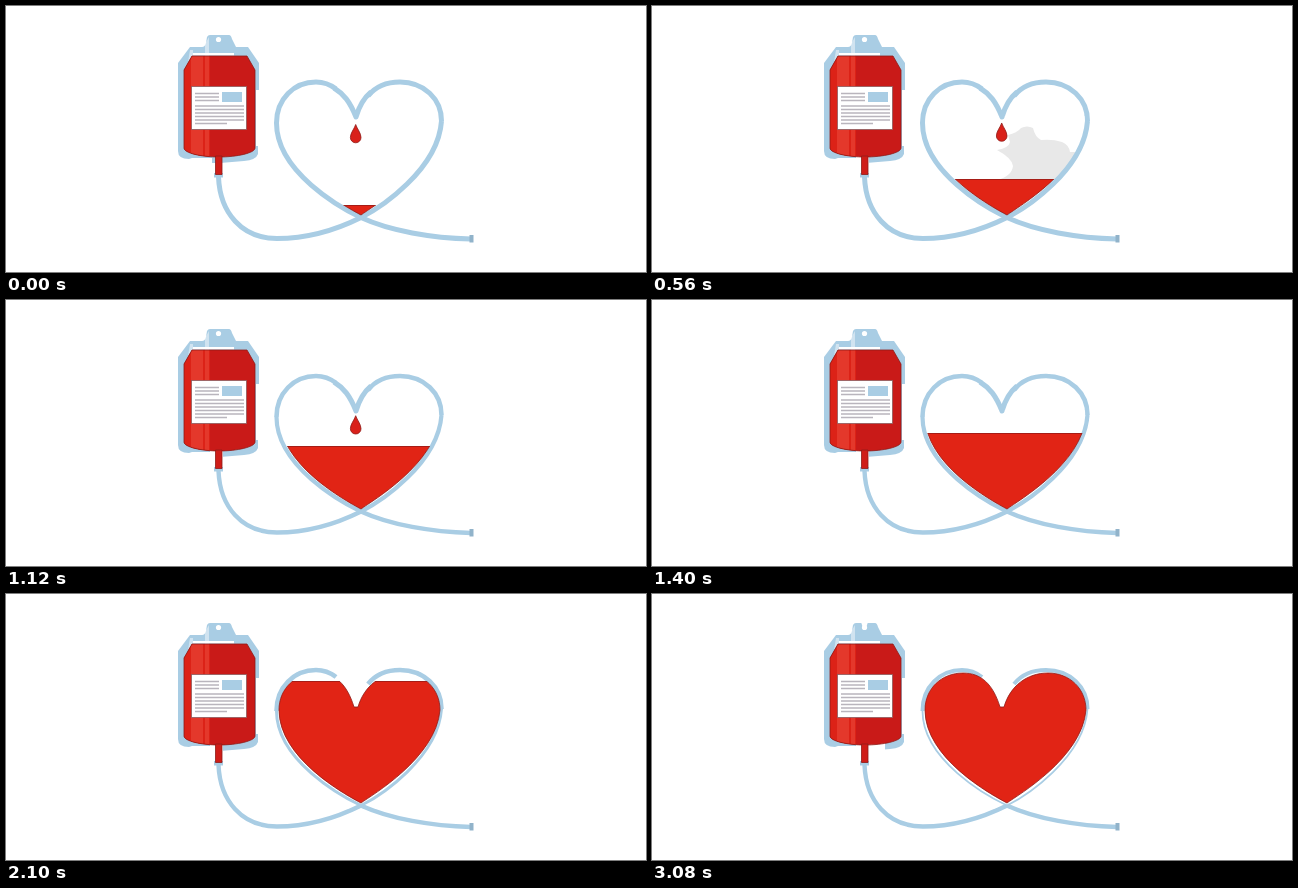
These frames come from a looping animation (640x266 px, 3.15 s). An HTML page:

```html
<!DOCTYPE html>
<html lang="en">
<head>
<meta charset="utf-8">
<title>Blood donation</title>
<style>
html, body { margin: 0; width: 100%; height: 100%; overflow: hidden; background: #fff; }
svg { display: block; width: 100vw; height: 100vh; }
.tube { fill: none; stroke: #a9cde4; stroke-width: 5; stroke-linejoin: round; }
.edge { stroke: #8f1b17; stroke-width: .8; }
.print { fill: none; stroke: #b9b5bd; stroke-width: 1.3; }
</style>
</head>
<body>
<svg viewBox="0 0 640 266">
  <defs>
    <clipPath id="level"><rect id="fill" x="260" width="190" height="150"/></clipPath>
    <clipPath id="body"><path id="bagShape" d="M186 50H241L249 64V142C249 147 231 151 213 151S178 147 178 142V64Z"/></clipPath>
  </defs>

  <!-- bag -->
  <path fill="#a9cde4" d="M201 31Q202 29 204 29H223Q225 29 226 33L230 41H242L253 57V84H250V140H252V148Q250 154 238 155L214 157H206V152H186L183 153Q172 153 172 145V57L184 41H196Q199 41 200 37Z"/>
  <path fill="#fff" d="M187 47H228V49.5H187Z"/>
  <path fill="#fff" opacity=".45" d="M199 38L203 31V50H199ZM184 44H187V50L182 56Z"/>
  <circle cx="212.5" cy="33.5" r="2.6" fill="#fff"/>
  <path id="notch" fill="#fff" d="M209 28H216L214 34H211Z"/>
  <rect id="gap" x="204" y="146" height="12" fill="#fff"/>
  <g clip-path="url(#body)">
    <path fill="#c91a18" d="M170 45H255V155H170Z"/>
    <path fill="#dc2217" d="M170 45H204V155H170Z"/>
    <path fill="#e4382b" d="M185 45H197V155H185ZM199 45H203V155H199Z"/>
  </g>
  <use href="#bagShape" fill="none" class="edge"/>
  <rect x="185.5" y="80.5" width="55" height="43" fill="#fff" stroke="#8d5a5c" stroke-width=".8"/>
  <rect x="216" y="86" width="20" height="10" fill="#a9cde4"/>
  <path class="print" d="M189 87.5H213M189 91H213M189 94.5H213M189 100H238M189 103.5H238M189 107H238M189 110.5H238M189 114H238M189 117.5H221"/>
  <path fill="#a9cde4" d="M208 167H217V171.500H208Z"/>
  <path class="edge" fill="#cf1d18" d="M209.500 150H216V168.500H209.500Z"/>

  <path id="blob" fill="#e8e8e8" d="M356 129Q365 127 369 122Q375 119 381 122Q383 131 389 134Q401 133 410 136Q417 139 418 146H424Q416 160 403 174H345Q360 170 361 160Q360 152 345 144Q357 142 358 136Z"/>

  <!-- tubing -->
  <path id="line" class="tube" d="M212.500 171C214 207 236 232.500 271 232.500C304 232.500 334 222 355 211.500M355 211.500C384 225 426 232 465 233"/>
  <path fill="#91b3ca" d="M463.500 229H467.500V236.500H463.500Z"/>
  <path id="lower" class="tube" d="M270.500 117C270.500 166 335 202 355 211.500C374 202 432 164 435.500 115"/>
  <path id="valley" class="tube" d="M328 82C338 88 344 96 350 111C354 97 359 91 365 86"/>
  <path id="upper" class="tube" d="M270.500 117C270.500 93 288 76 310 76Q321 76 330 83M362 90C370 80 382 76 394 76C418 76 435.500 93 435.500 115"/>

  <path id="drop" class="edge" fill="#d9211a" d="M0 .5C1.500 5 5.300 9 5.300 13.500A5.300 5.300 0 0 1 -5.300 13.500C-5.300 9 -1.500 5 0 .5Z"/>

  <!-- blood in the heart -->
  <g clip-path="url(#level)">
    <path class="edge" fill="#e12415" d="M355 209C338 200 273 164 273 116C273 94 290 79 311 79C329 79 341 90 348 113H352C358 92 375 79 396 79C418 79 434 95 434 116C430 164 366 201 355 209Z"/>
    <path id="surface" class="edge" d="M260 0H450" clip-path="url(#heartClip)"/>
  </g>
  <clipPath id="heartClip"><path id="heartArea"/></clipPath>
</svg>
<script>
const LOOP = 3150, STEP = 70, DRIP = 630;
const el = id => document.getElementById(id);
const levels = [[0, 199], [560, 173], [840, 159], [1400, 133], [2100, 87], [2310, 76]];

function levelAt(t) {
  for (let i = 1; i < levels.length; i++) {
    const [t0, y0] = levels[i - 1], [t1, y1] = levels[i];
    if (t <= t1) return y0 + (y1 - y0) * (t - t0) / (t1 - t0);
  }
  return 76;
}

// A drop swells slowly at the tip, then falls into the blood.
function dropY(t) {
  const p = (t + DRIP - 210) % DRIP;
  return p <= 420 ? 113 + 5 * (p / 420) ** 2 : 118 + 75 * ((p - 420) / 210) ** 2;
}

const show = (id, on) => el(id).style.display = on ? "" : "none";
const width = (id, w) => el(id).style.strokeWidth = w;

// The surface line follows the heart outline.
el("heartArea").setAttribute("d", document.querySelector("g[clip-path='url(#level)'] path").getAttribute("d"));

function draw(now) {
  const t = Math.floor(now % LOOP / STEP) * STEP;
  const y = levelAt(t);
  el("fill").setAttribute("y", y);
  el("surface").setAttribute("d", `M260 ${y + .4}H450`);
  el("drop").setAttribute("transform", `translate(349.7 ${dropY(t)})`);
  show("drop", t < 1470);
  show("blob", t >= 490 && t < 630);
  show("valley", t < 1820);
  show("notch", t >= 2400);
  el("gap").setAttribute("width", t < 560 ? 0 : t < 2400 ? 13 : 29);
  width("line", t < 700 ? 5 : 4.4);
  width("upper", t < 700 ? 5 : t < 2310 ? 4.6 : 4);
  width("lower", t < 700 ? 5 : t < 1820 ? 4.2 : t < 2310 ? 3 : 1.8);
  requestAnimationFrame(draw);
}
requestAnimationFrame(draw);
</script>
</body>
</html>
```
